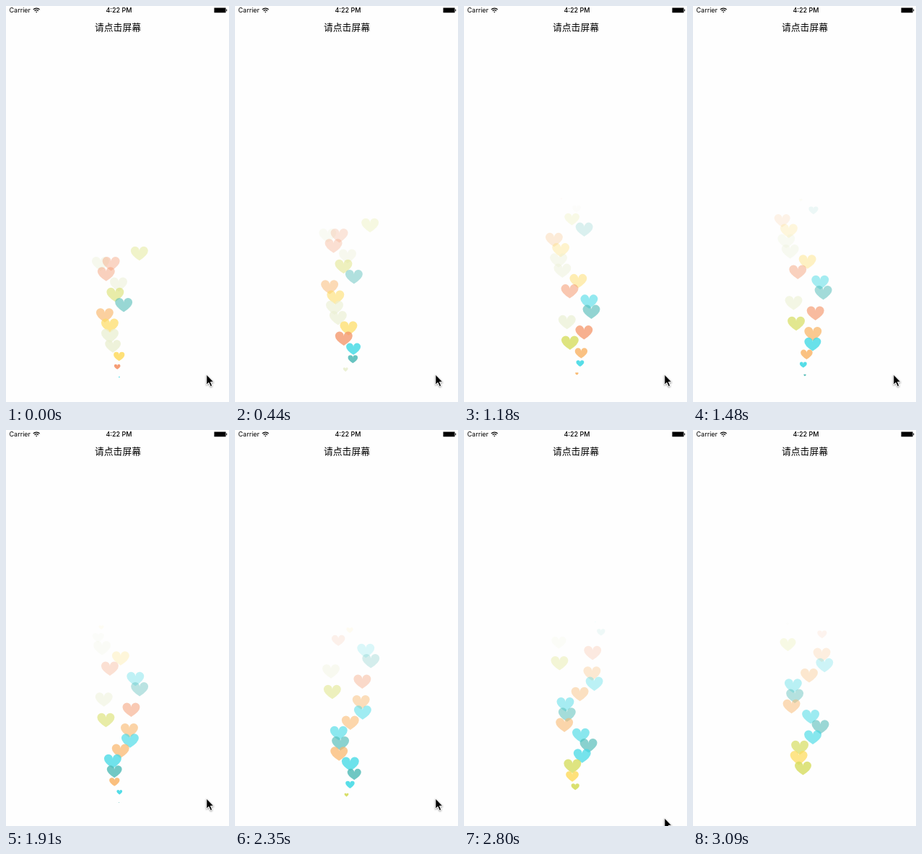
An HTML page that plays this animation: 309x548 px, repeating every 3.19 s.

```html
<!DOCTYPE html>
<html lang="zh">
<head>
<meta charset="utf-8">
<style>
  html, body { margin: 0; width: 100%; height: 100%; overflow: hidden; background: #fefefe; }
  svg { display: block; width: 309px; height: 548px; }
  text { font: 9px Inter, "Liberation Sans", sans-serif; }
  .title { font: 12.8px "Noto Sans CJK SC", "Noto Sans CJK", sans-serif; }
</style>
</head>
<body>
<svg viewBox="0 0 309 548">
  <text x="4.5" y="9.3">Carrier</text>
  <g fill="none" stroke="#000" stroke-width="1.3">
    <path d="M37.8 4.9a6.2 6.2 0 0 1 8.8 0M39.6 6.7a3.7 3.7 0 0 1 5.2 0"/>
    <path d="M42.2 9.3l-1.2-1.3a1.8 1.8 0 0 1 2.4 0z" fill="#000" stroke="none"/>
  </g>
  <text x="156.5" y="9.3" text-anchor="middle" font-weight="500" style="font-weight:500">4:22 PM</text>
  <path d="M288.5 2.5h16v6.8h-16zM305.2 4.6h1v2.6h-1z"/>
  <text class="title" x="155" y="34.3" text-anchor="middle">请点击屏幕</text>
  <g id="hearts"></g>
  <path id="cursor" d="M0 0V14.2L3.2 11.2L5.6 16.6L8 15.6L5.7 10.3H10Z" stroke="#fff" stroke-width="1"
    style="filter:drop-shadow(0 1px 1px #0006)"/>
</svg>
<script>
const LOOP = 3190;
const STEPS = [0, 150, 290, 440, 590, 730, 880, 1030, 1180, 1330, 1480, 1620, 1770,
  1910, 2060, 2200, 2350, 2500, 2650, 2800, 2940, 3090];
const START = { x: 156, y: 518 }, RISE = 256, SPEED = 0.0885, GAP = 14.25;
const COLORS = { L: '#d6dd60', P: '#eaefd2', S: '#f4966a', T: '#54bcb8',
  O: '#f9b76d', Y: '#fedc63', C: '#46dae5' };
const SHAPE = 'M-12-3.7a6 6 0 0 1 12 0a6 6 0 0 1 12 0Q12 2.3 0 9.8Q-12 2.3-12-3.7z';

// One colour letter and one final sideways drift per heart, oldest first.
const hues = 'LPSSPLTOYPPYSCTPSLOCOCTOCTCLYL';
const drifts = [32, -29, -12, -21, 0, -6.5, 11, -33, -24, -28.5, -23.5, 3, -13, 26, 34,
  -25, 23, -25, 23.4, 28, 5.5, -19.7, -18, -25, 9.8, 31, 17, -15.3, -21.4, -10];

const group = document.getElementById('hearts');
const cursor = document.getElementById('cursor');
const hearts = drifts.map((drift, i) => {
  const el = document.createElementNS('http://www.w3.org/2000/svg', 'path');
  el.setAttribute('d', SHAPE);
  el.setAttribute('fill', COLORS[hues[i]]);
  group.append(el);
  // The first three left almost together.
  const order = i ? Math.max(i, 2) - 1 : 0;
  return { el, drift, y: 342.5 + GAP * order };
});

const clamp = v => Math.max(0, Math.min(1, v));

function draw(t) {
  for (const { el, drift, y: y0 } of hearts) {
    const y = y0 - SPEED * t;
    const p = (START.y - y) / RISE;
    const x = START.x + drift * (1 - (1 - p) ** 2);
    const scale = Math.min(clamp((START.y - y) / 52), clamp((y - 262) / 38));
    el.setAttribute('transform', `translate(${x} ${y}) scale(${scale})`);
    el.setAttribute('opacity', clamp((y - 255) / 263));
  }
  const cursorY = t < 2650 ? 510 : t < 2800 ? 520.5 : t < 2940 ? 537 : 570;
  cursor.setAttribute('transform', `translate(277.8 ${cursorY})`);
}

const began = performance.now();
function frame() {
  const t = (performance.now() - began) % LOOP;
  draw(STEPS.findLast(s => s <= t) ?? 0);
  requestAnimationFrame(frame);
}
frame();
</script>
</body>
</html>
```
